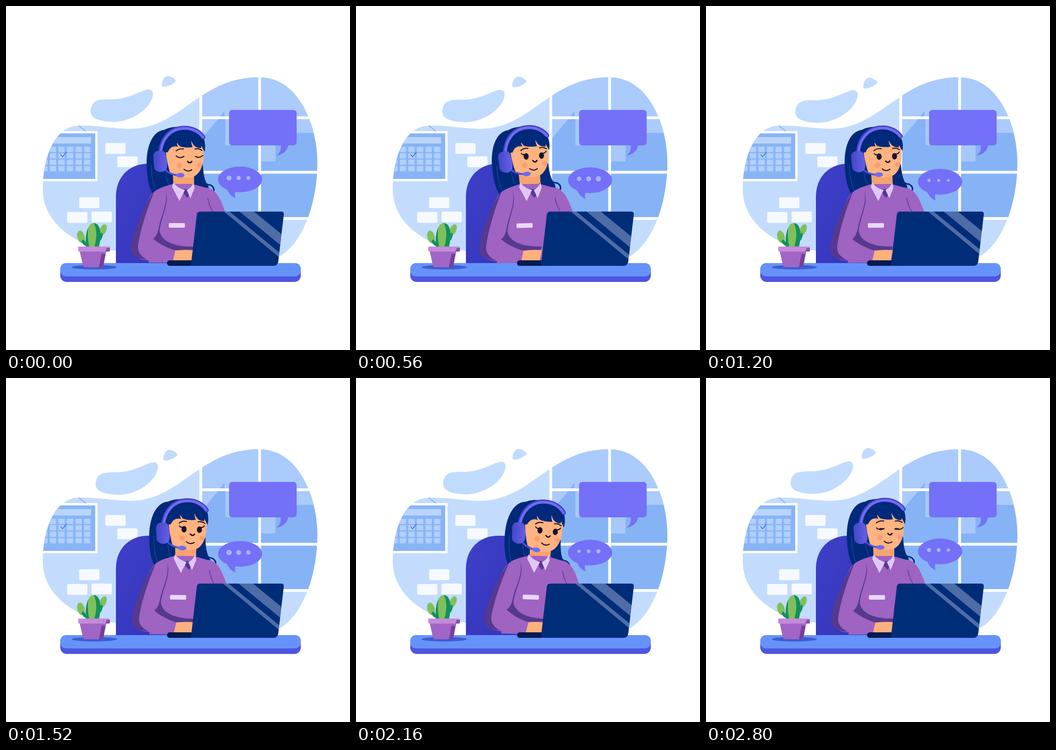
Write an HTML page that moves like this. It is 748 px wide and 748 px high and loops after 2.88 s.

```html
<!DOCTYPE html>
<html lang="en">
<head>
<meta charset="utf-8">
<title>Support desk</title>
<style>
html, body { margin: 0; width: 100%; height: 100%; overflow: hidden; background: #fff; }
svg { display: block; width: 100%; height: 100%; }
.line { fill: none; stroke-linecap: round; stroke-linejoin: round; }
</style>
</head>
<body>
<svg viewBox="0 0 748 748">
  <defs>
    <clipPath id="room"><path d="M80 400C80 330 105 262 158 260C200 259 235 267 270 267C380 267 420 155 550 155C640 155 677 265 677 340C677 430 645 515 597 543L240 532C150 525 80 470 80 400Z"/></clipPath>
    <clipPath id="screen"><path id="lid" d="M415 453Q416 447 422 447H598Q605 447 604 454L592 556Q590 565 582 565H402Z"/></clipPath>
    <linearGradient id="chair" x2="1" y2="1"><stop stop-color="#3d40c9"/><stop offset="1" stop-color="#3434b9"/></linearGradient>
    <linearGradient id="cup"><stop stop-color="#4546c6"/><stop offset="1" stop-color="#6460ea"/></linearGradient>
  </defs>

  <g fill="#c0dbfe">
    <path id="cloud" d="M184 228C186 205 200 203 225 203C262 204 285 188 305 182C320 178 322 190 317 203C305 230 270 251 235 252C205 252 183 245 184 228Z"/>
    <path id="drop" d="M339 174C337 165 344 152 352 152C360 153 371 160 369 164C362 171 345 179 339 174Z"/>
  </g>

  <g clip-path="url(#room)">
    <path fill="#c3dcfe" d="M70 140H690V570H70Z"/>
    <path fill="#aacbfc" d="M424 140H690V243H424Z"/>
    <path fill="#86b3f5" d="M424 243H690V462H424Z"/>
    <path fill="#aacbfc" d="M424 243H464L424 290ZM632 246H690V276H632Z"/>
    <path fill="#86b3f5" d="M463 243L475 228V243Z"/>
    <path class="line" stroke="#fff" stroke-width="6" d="M423.500 140V462M551.500 140V462M424 243H690M424 361.500H690M424 462H690"/>
    <path fill="#a6c9fa" d="M477 246H487V303H477ZM555 302H586V338H555Z"/>

    <path fill="#88b4f6" stroke="#fff" stroke-width="5" d="M60 274.500H196.500V378.500H60Z"/>
    <path fill="#b9d5fd" d="M60 285H185V299H60Z"/>
    <g id="days" fill="#b0cffc"></g>
    <path class="line" stroke="#4169c5" stroke-width="1.600" d="M119 323L123 328L131 318"/>
    <path class="line" stroke="#78a3e6" stroke-width="1.500" d="M158 260L173 272"/>
  </g>
  <g id="bricks" fill="#f6faff"></g>

  <path fill="url(#chair)" d="M239 560V415C239 370 270 343 308 343H350V560Z"/>

  <rect x="118" y="559" width="523" height="41" rx="14" fill="#4e55e2"/>
  <path fill="#6693fb" d="M118 573Q118 559 132 559H627Q641 559 641 573V577Q639 588 627 588H132Q120 588 118 577Z"/>

  <ellipse cx="192" cy="568" rx="49" ry="5" fill="#405ccd"/>
  <g fill="#7fc05c">
    <ellipse cx="163" cy="502" rx="8" ry="14" transform="rotate(-14 163 502)"/>
    <ellipse cx="211" cy="487" rx="7" ry="13" transform="rotate(24 211 487)"/>
    <path class="line" fill="none" stroke="#129060" stroke-width="7" d="M168 512Q172 520 179 519M207 497Q205 508 199 511"/>
    <path d="M176 524C173 499 176 472 191 472C207 473 208 500 202 524Z"/>
    <path fill="#129060" d="M191 472C207 473 208 500 202 524H192C198 503 198 486 191 472ZM174 524Q171 498 179 481Q176 500 181 524Z"/>
  </g>
  <path fill="#a166c5" d="M160 532H218L212 563Q211 568 206 568H173Q168 568 167 563Z"/>
  <path fill="#74409c" d="M160 534H218L217 540L208 538L202 568H206Q211 568 212 563L218 532H160Z"/>
  <rect x="157" y="523" width="69" height="11" rx="3" fill="#c58ada"/>
  <path fill="#8850ad" d="M216 534L219 526H226V531Q226 534 223 534Z"/>

  <g class="head">
    <path fill="#00297a" d="M380 263C358 262 349 267 345 269C314 272 304 315 306 350C307 376 311 395 320 410L350 420H445L440 392C431 380 429 362 428 346Z"/>
    <path class="line" stroke="#1c449b" stroke-width="1.500" d="M316 345Q316 380 326 402M347 362Q349 382 357 393"/>
    <path class="line" stroke="#00297a" stroke-width="3" d="M428 378Q436 390 444 389Q455 395 451 404"/>
    <path fill="#f6a36f" d="M362 350H409V386L390 404L364 390Z"/>
  </g>

  <g id="body">
    <path fill="#9f63c2" d="M363 387C338 394 322 399 312 416C298 442 277 496 274 526C275 547 295 553 310 553V558H410V545H478V450C469 430 461 396 434 395L405 387Z"/>
    <path fill="#56398f" d="M322 404C306 420 275 490 272 525C271 543 285 550 308 552C291 543 284 533 288 515C294 480 307 442 322 404Z"/>
    <path fill="#56398f" d="M347 402C356 430 338 455 334 489C339 516 374 524 408 523L406 531H366C350 526 330 516 320 506C328 500 331 490 333 478C340 448 352 430 347 402Z"/>
    <path fill="#9f63c2" d="M336 489C346 513 372 521 408 522V470H340Z"/>
    <path class="line" stroke="#6d419f" stroke-width="2" d="M439 418Q441 433 449 446"/>
    <path fill="#fdb17c" d="M368 532Q386 529 408 531L403 554H363Z"/>
    <path fill="#56398f" d="M385 398H400L399 411L394 417L387 409Z"/>
    <path fill="#dfc8f7" d="M364 384L361 393L377 424L389 400Q374 397 364 384ZM408 383L410 396L401 418L393 400Q404 395 408 383Z"/>
    <rect x="354" y="472" width="35" height="10" rx="2" fill="#e8d8fa"/>
  </g>

  <g class="head">
    <path fill="#ffb37f" d="M345 298H428C432 327 430 355 413 368C399 378 374 374 357 363Q349 340 345 298Z"/>
    <g fill="#f59672" opacity=".75"><circle cx="377" cy="347" r="6"/><circle cx="421" cy="346" r="5.500"/></g>
    <path fill="#00297a" d="M343 319C338 285 360 263 390 261C421 263 438 288 432 317Q428 311 425 304L424 309Q417 309 412 306Q406 302 403 293Q403 301 406 307Q389 309 378 305Q372 300 371 292Q371 301 374 306Q358 302 352 318Z"/>
    <g class="line" stroke="#17132f" stroke-width="2.200">
      <path d="M370 315Q377 309 386 311M411 311Q419 309 426 314M387 355Q396 362 404 356"/>
      <path d="M395 338Q400 344 404 338" stroke-width="3"/>
      <path id="closed" d="M370 326Q378 333 387 327M412 327Q420 332 428 325"/>
      <path id="lashes" d="M371 321Q373 325 378 324M417 323Q422 324 425 319"/>
    </g>
    <g fill="#17132f"><ellipse class="eye" cx="381" cy="328" rx="5.500"/><ellipse class="eye" cx="414.500" cy="328" rx="5.500"/></g>
    <path class="line" stroke="#3f41bd" stroke-width="9" d="M335 322C337 288 357 266 386 265C405 264 421 273 429 285"/>
    <path class="line" stroke="#706bf3" stroke-width="5.500" d="M336 322C338 289 358 267 386 266C405 265 420 274 428 285"/>
    <g id="mic">
      <path class="line" stroke="#4e4ed6" stroke-width="4" d="M344 354Q356 367 374 368"/>
      <ellipse cx="379" cy="368" rx="9" ry="5" fill="#706bf3"/>
    </g>
    <path fill="url(#cup)" d="M320 326Q321 316 331 315Q342 312 346 320Q352 338 350 352Q346 362 335 361Q325 360 322 352Z"/>
  </g>

  <rect x="350" y="553" width="70" height="12" rx="6" fill="#021b50"/>
  <use href="#lid" fill="#002d78"/>
  <g clip-path="url(#screen)">
    <path id="glare" fill="#8fa0cc" opacity=".55" d="M465 447H477L617 562V573H617ZM499 447H530L640 537V563Z"/>
  </g>

  <g fill="#7470f8">
    <rect x="485" y="226" width="147" height="77" rx="7"/>
    <path d="M597 300Q600 318 588 325Q611 322 614 300Z"/>
    <g id="bubble">
      <ellipse cx="509" cy="377" rx="48" ry="28"/>
      <path d="M480 396Q484 411 499 418Q496 408 500 400Z"/>
      <g fill="#a6b5fc"><circle class="dot" cx="485" cy="374"/><circle class="dot" cx="506" cy="374"/><circle class="dot" cx="527" cy="374"/></g>
    </g>
  </g>
</svg>
<script>
const LOOP = 2880, STEP = 80, TAU = Math.PI * 2;
const $ = id => document.getElementById(id);
const all = name => [...document.querySelectorAll(name)];
const place = (node, value) => node.setAttribute('transform', value);
const rect = (x, y, w, h, r) => `<rect x="${x}" y="${y}" width="${w}" height="${h}" rx="${r}"/>`;

$('bricks').innerHTML = [[216, 298], [242, 327], [159, 416], [133, 448], [186, 447]]
  .map(([x, y]) => rect(x, y, 44, 23.5, 3)).join('');
for (let i = 0; i < 24; i++)
  $('days').innerHTML += rect(76.5 + i % 6 * 18.6, 306 + (i / 6 | 0) * 14, 14, 11.5, 1.5);

const heads = all('.head'), eyes = all('.eye'), dots = all('.dot');
const sway = [[0, 0], [720, -.65], [2160, 1], [LOOP, 0]];
const shine = [[0, 9], [320, 0], [880, 6], [1200, 18], [1760, 0], [2160, 12], [2800, 10], [LOOP, 9]];

// Eased value between [time, value] keys
function track(keys, t) {
  const i = keys.findIndex(key => key[0] > t);
  const [t0, a] = keys[i - 1], [t1, b] = keys[i];
  return a + (b - a) * (1 - Math.cos(Math.PI * (t - t0) / (t1 - t0))) / 2;
}

function draw(t) {
  const lean = track(sway, t);
  const drift = (1 - Math.cos(TAU * t / LOOP)) / 2;
  heads.forEach(head => place(head, `rotate(${5.5 * lean} 357 528)`));
  place($('body'), `translate(${6 * lean}) rotate(${1.8 * lean} 390 560)`);
  place($('mic'), `rotate(${4 * lean} 336 338)`);

  const open = Math.min(1, Math.max(0, (Math.min(t, LOOP - t) - 40) / 160));
  eyes.forEach(eye => eye.setAttribute('ry', 7 * open));
  $('closed').style.opacity = open < .5 ? 1 : 0;
  $('lashes').style.opacity = open < .5 ? 0 : 1;

  place($('cloud'), `translate(${11 * drift} ${2 * drift})`);
  place($('drop'), `translate(${3.5 * drift} ${4 * drift})`);
  place($('bubble'), `translate(0 ${5.5 * drift})`);
  place($('glare'), `translate(${track(shine, t)})`);
  dots.forEach((dot, i) =>
    dot.setAttribute('r', 4.4 + 1.8 * Math.cos(TAU * (t - 250 - 70 * i) / (LOOP / 2))));
}

const start = performance.now();
function tick() {
  const t = (performance.now() - start) % LOOP;
  draw(Math.floor(t / STEP) * STEP);
  requestAnimationFrame(tick);
}
tick();
</script>
</body>
</html>
```
